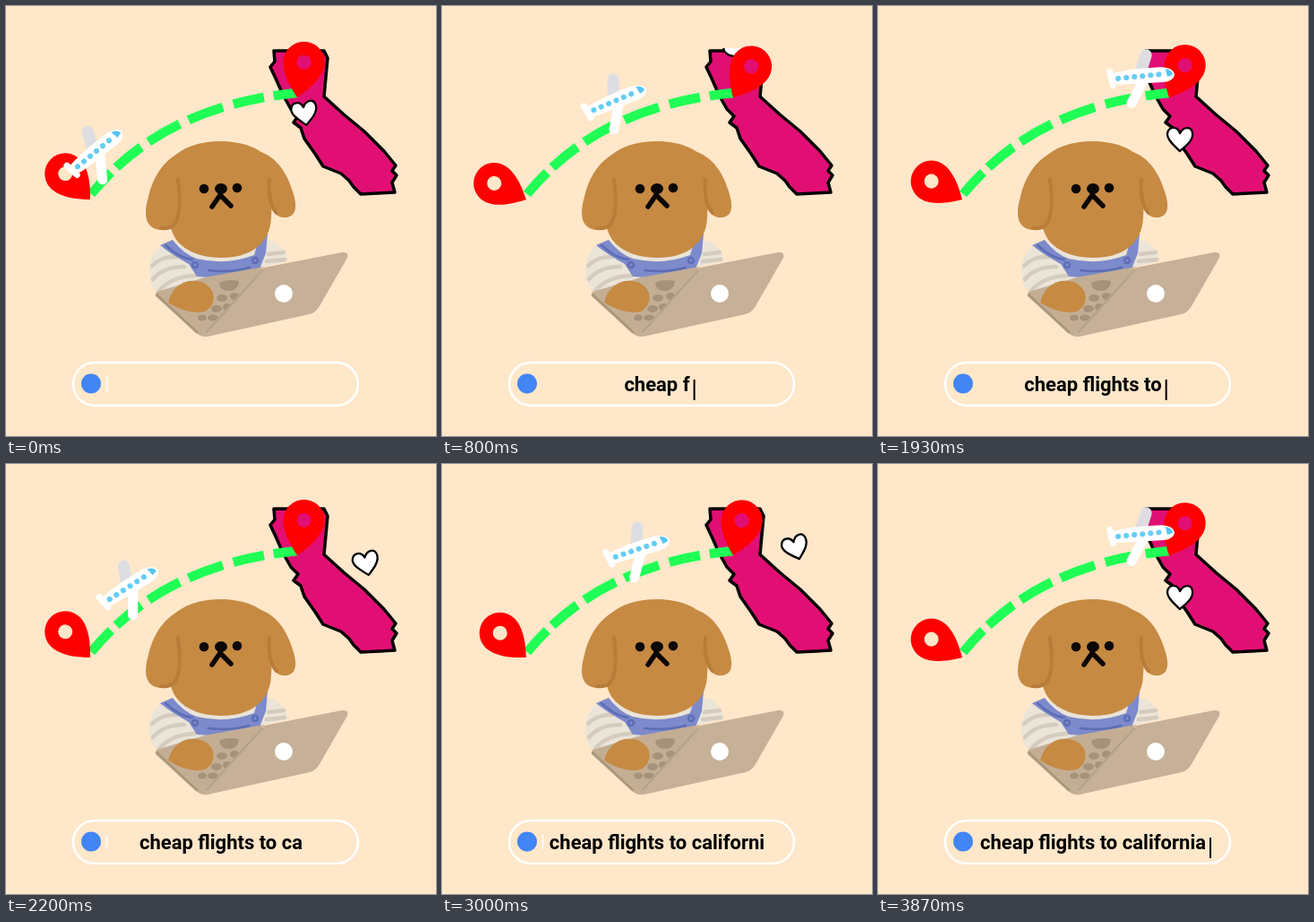
Recreate the animation shown at these times as an HTML page. Size 480 by 480 pixels, loop 3990 ms.

```html
<!DOCTYPE html>
<html lang="en">
<head>
<meta charset="utf-8">
<title>Cheap flights</title>
<style>
  html, body { margin: 0; width: 100%; height: 100%; overflow: hidden; background: #ffe7ca; }
  svg { display: block; width: 100%; height: 100%; }
  text { font: 700 22px Roboto, Arial, sans-serif; text-anchor: middle; }
  .line { fill: none; stroke-linecap: round; stroke-linejoin: round; }
</style>
</head>
<body>
<svg viewBox="0 0 480 480">
  <defs>
    <path id="pin" fill="#f00" fill-rule="evenodd"
      d="M0 0C-8-8-23-24-23-40A23 23 0 0 1 23-40C23-24 8-8 0 0ZM-8-40a8 8 0 1 0 16 0a8 8 0 1 0-16 0Z"/>
    <clipPath id="sky"><rect y="47" width="480" height="433"/></clipPath>
  </defs>

  <!-- body -->
  <path fill="#eae4d9" d="M176 265Q160 276 160 297Q161 316 175 324L220 318L232 296L282 292L314 285Q313 271 298 262Z"/>
  <path class="line" stroke="#d5cbbe" stroke-width="4.500"
    d="M163 290Q174 279 190 280M164 305Q176 291 199 291M171 318Q184 302 211 301M293 277L310 275M291 285L311 283"/>
  <path fill="#7d8acb" d="M172 267L186 261Q198 277 213 282Q246 290 277 278L284 254L292 254L290 276L282 296Q248 306 213 302L204 288Q184 277 172 267Z"/>
  <g class="line" stroke="#5d6db5" stroke-width="2.500">
    <path d="M178 267Q194 282 208 283M226 295Q250 298 272 292"/>
    <circle cx="211" cy="289" r="3"/><circle cx="278" cy="284" r="3"/>
  </g>

  <!-- head -->
  <g fill="#c68a43">
    <path d="M183 172C197 157 216 151 240 151C266 151 286 160 297 174C300 190 297 213 296 236C295 266 272 281 241 281C208 281 183 266 183 238Z"/>
    <path d="M194 164C176 172 164 191 159 213C152 237 158 249 173 250C190 250 196 236 194 216Z"/>
    <path d="M285 163C303 170 314 187 320 207C327 228 322 237 309 236C301 235 297 229 294 221Z"/>
  </g>
  <path class="line" stroke="#b87d39" stroke-width="4"
    d="M192 194Q197 231 188 244Q183 249 173 248M294 194Q292 220 302 231"/>
  <g fill="#0b0705">
    <circle cx="221" cy="204" r="5.300"/><circle cx="258" cy="203" r="5.300"/>
    <ellipse cx="240" cy="204" rx="7" ry="6"/>
  </g>
  <path class="line" stroke="#0b0705" stroke-width="5.500" d="M240 205L239 211L230 224M239 211L251 223"/>

  <!-- laptop -->
  <path fill="#c4ae93" d="M168 319L222 303L288 291L222 369Q216 369 211 364L167 324Z"/>
  <g fill="#a6927a">
    <path d="M238 309Q246 304 260 307Q260 316 251 318Q239 319 238 309Z"/>
    <ellipse cx="241" cy="326" rx="6" ry="4"/><ellipse cx="255" cy="324" rx="5" ry="4"/>
    <ellipse cx="235" cy="338" rx="6" ry="4"/><ellipse cx="247" cy="336" rx="5" ry="4"/>
    <ellipse cx="219" cy="348" rx="5" ry="3.500"/><ellipse cx="231" cy="348" rx="6" ry="3.500"/>
  </g>
  <path class="line" stroke="#aa967b" stroke-width="2.500" d="M168 322L213 364"/>
  <path fill="#c68a43" d="M181 331Q186 311 204 307Q224 305 231 320Q234 334 222 341Q203 345 181 331Z"/>
  <path fill="#c6b097" d="M288 292L375 275Q383 274 381 281L350 335Q346 342 339 344L225 369Q218 370 222 364Z"/>
  <path class="line" stroke="#b5a088" stroke-width="2" d="M286 295L224 364"/>
  <circle cx="310" cy="321" r="10" fill="#fff"/>

  <path fill="#e10f74" stroke="#000" stroke-width="3.500" stroke-linejoin="round"
    d="M299 50H355L359 58L355 101L377 121L400 140L422 162L435 178L431 184L436 189L431 197L434 208L396 210L388 202L383 195L374 187L354 179L345 165L333 148L329 136L321 130L326 123L318 115L309 99L302 83L295 68L300 62Z"/>
  <path fill="none" stroke="#20ff55" stroke-width="10.500" stroke-dasharray="33 8 36 10 40 11 41 12 35 11 27 99"
    d="M95 210Q176 111 325 97"/>

  <g clip-path="url(#sky)">
    <path id="heart" fill="#fff" stroke="#000" stroke-width="2.300" stroke-linejoin="round"
      d="M0 14C-6 8-15 1-14-6C-12-14-3-14 0-6C4-14 13-14 14-6C15 2 6 9 0 14Z"/>
  </g>
  <use id="left" href="#pin"/>
  <use id="right" href="#pin"/>

  <g id="plane">
    <path class="line" stroke="#dedee2" stroke-width="13" d="M7-23L1-6"/>
    <path class="line" stroke="#fff" stroke-width="11" d="M4 4L-11 30"/>
    <path class="line" stroke="#fff" stroke-width="7" d="M-34-6L-31 9"/>
    <path fill="#fff" d="M-36-3Q-10-9 23-9Q37-8 38 0Q37 7 25 8L-22 9Q-37 9-36-3Z"/>
    <path class="line" stroke="#65cdf5" stroke-width="6" stroke-dasharray=".1 9" d="M-25 2L22-1"/>
    <path fill="#55c5f3" d="M28-7Q36-5 36 0L30 2Z"/>
  </g>

  <!-- search bar -->
  <rect x="75" y="398" width="318" height="48" rx="24" fill="none" stroke="#fff" stroke-width="2.500"/>
  <circle cx="95" cy="421.500" r="11" fill="#4285f4"/>
  <path id="caret" stroke="#fff" stroke-width="1.500" d="M112.500 414V430"/>
  <text id="query" x="240" y="429.500"></text>
  <path id="cursor" stroke="#000" stroke-width="2" d="M0 417V440"/>
</svg>
<script>
const LOOP = 3990, STEP = 200 / 3, CYCLE = 29, LAST = 58;
const PHRASE = 'cheap flights to california';

// Where the heart touches the coast: step, x, y
const stops = [[0, 333, 119], [12, 330, 47], [22, 327, 193], [29, 337, 148], [38, 332, 63], [LAST, 337, 148]];

const [heart, left, right, plane, caret, query, cursor] =
  ['heart', 'left', 'right', 'plane', 'caret', 'query', 'cursor'].map(id => document.getElementById(id));

const mix = (a, b, u) => a + (b - a) * u;

function place(node, x, y, angle = 0) {
  node.setAttribute('transform', `translate(${x} ${y}) rotate(${angle})`);
}

function show(node, on) {
  node.setAttribute('visibility', on ? 'visible' : 'hidden');
}

// The heart swings out to the right between two stops
function moveHeart(step) {
  const n = Math.max(1, stops.findIndex(s => s[0] >= step));
  const [t0, x0, y0] = stops[n - 1], [t1, x1, y1] = stops[n];
  const u = (step - t0) / (t1 - t0);
  const y = mix(y0, y1, u);
  place(heart, mix(x0, x1, u) + 68 * Math.sin(Math.PI * u), y, (y - 145) * .35);
}

function movePlane(phase) {
  const u = (phase / CYCLE) ** .83;
  place(plane, mix(99, 293, u), 78 + 85 * (1 - u) ** 1.7, mix(-36, -2, u));
}

// The pins rest first, then rock in opposite directions
function movePins(phase) {
  const sway = 20 * Math.sin(2 * Math.PI * Math.max(0, phase - 9) / 14.7);
  place(left, 94, 216, -44 - sway);
  place(right, 325, 102, 11 + sway);
}

function type(ms) {
  query.textContent = PHRASE.slice(0, Math.floor(ms / 114)).trim();
  place(cursor, 245 + query.getComputedTextLength() / 2, 0);
  show(cursor, ms % 1000 > 499);
  show(caret, ms % 1000 < 540);
}

function draw(t) {
  const step = Math.min(LAST, Math.floor((t + 4) / STEP));
  const phase = step > CYCLE ? step - CYCLE : step;
  movePlane(phase);
  movePins(phase);
  moveHeart(step);
  type(step * STEP);
}

const start = performance.now();
function tick() {
  draw((performance.now() - start) % LOOP);
  requestAnimationFrame(tick);
}
tick();
</script>
</body>
</html>
```
